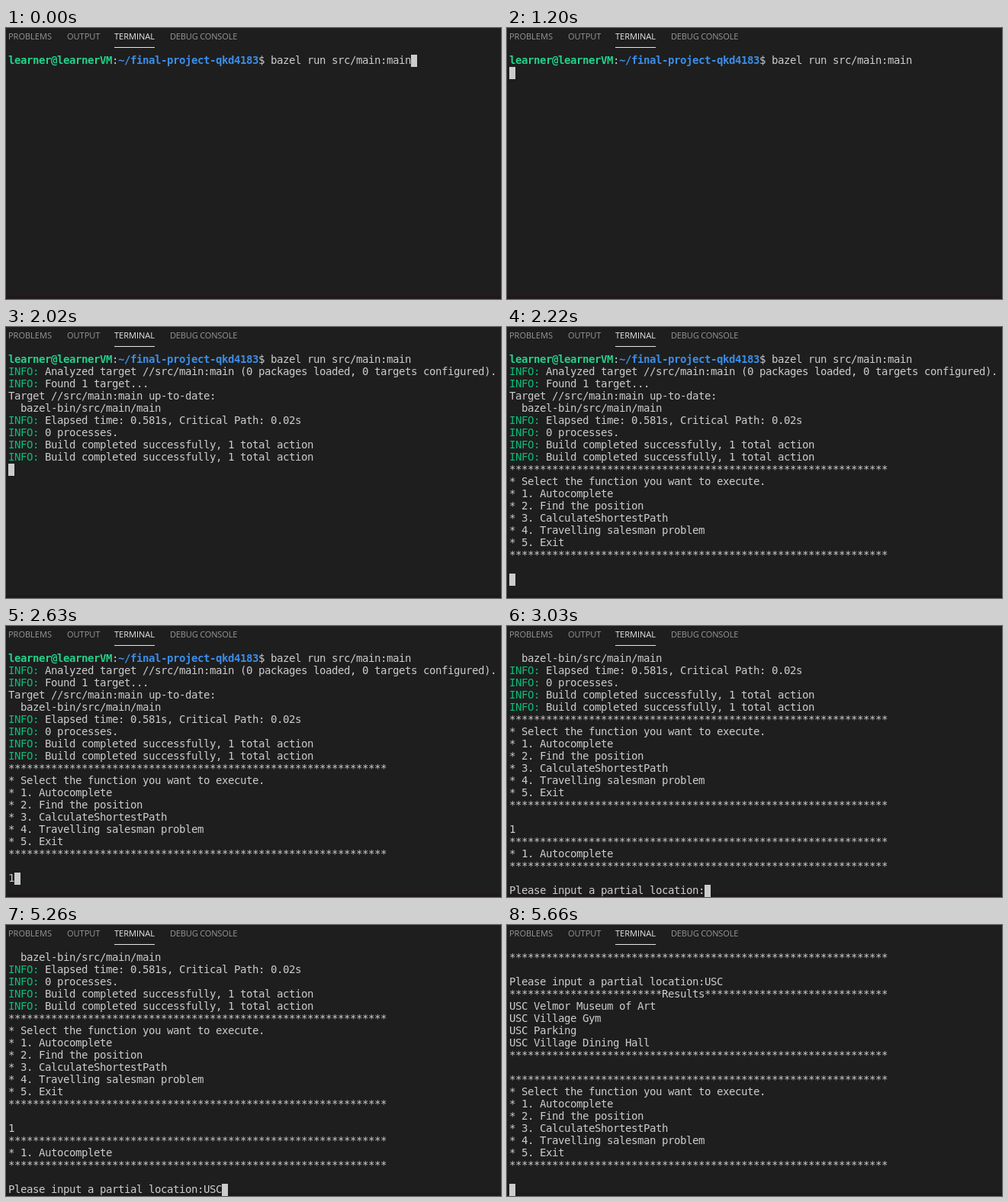
An HTML page that plays this animation: 649 by 355 pixels, repeating every 8110 ms.

```html
<!DOCTYPE html>
<html lang="en">
<head>
<meta charset="utf-8">
<title>Terminal session</title>
<style>
  html, body { margin: 0; width: 100%; height: 100%; overflow: hidden; background: #1e1e1e; }
  #stage { position: relative; width: 649px; height: 355px; overflow: hidden; background: #1e1e1e; }
  #edge { position: absolute; left: 0; right: 0; top: 351px; height: 4px; background: #1f191b; }
  .tab {
    position: absolute; top: 3px; height: 22px; white-space: nowrap;
    font: 11px/15px "Open Sans", "Noto Sans", sans-serif; color: #979797;
  }
  .tab.active { color: #e7e7e7; border-bottom: 1px solid #e7e7e7; }
  .tab.long { letter-spacing: -0.15px; }
  #screen {
    position: absolute; left: 3px; top: 34px; margin: 0; white-space: pre;
    font: 14px/16px "DejaVu Sans Mono", monospace; color: #ccc;
    letter-spacing: calc(8px - 1ch); /* 8px terminal cells */
  }
  #screen div { height: 16px; }
  #screen b { line-height: 16px; }
  .user { color: #23d18b; }
  .path { color: #3b8eea; }
  .info { color: #0dbc79; }
  #cursor { position: absolute; width: 8px; height: 16px; background: #ccc; }
</style>
</head>
<body>
<div id="stage">
  <div id="edge"></div>
  <div class="tab" style="left:3px">PROBLEMS</div>
  <div class="tab" style="left:80px">OUTPUT</div>
  <div class="tab active" style="left:142px">TERMINAL</div>
  <div class="tab long" style="left:215px">DEBUG CONSOLE</div>
  <pre id="screen"></pre>
  <div id="cursor"></div>
</div>
<script>
const LOOP = 8110, ROWS = 20, CELL_W = 8, CELL_H = 16;
const screenEl = document.getElementById('screen');
const cursorEl = document.getElementById('cursor');

const stars = n => '*'.repeat(n);
const rule = stars(62);
const prompt = ['learner@learnerVM', ':', '~/final-project-qkd4183', '$ bazel run src/main:main'];
const command = prompt.join('');

const analyzed = [
  'INFO: Analyzed target //src/main:main (0 packages loaded, 0 targets configured).',
  'INFO: Found 1 target...'
];
const done = 'INFO: Build completed successfully, 1 total action';
const built = [
  command, ...analyzed,
  'Target //src/main:main up-to-date:',
  '  bazel-bin/src/main/main',
  'INFO: Elapsed time: 0.581s, Critical Path: 0.02s',
  'INFO: 0 processes.',
  done, done
];
const menu = [
  rule,
  '* Select the function you want to execute.',
  '* 1. Autocomplete',
  '* 2. Find the position',
  '* 3. CalculateShortestPath',
  '* 4. Travelling salesman problem',
  '* 5. Exit',
  rule, ''
];
const asked = typed => [
  ...built, ...menu, '1',
  rule, '* 1. Autocomplete', rule, '',
  'Please input a partial location:' + typed
];
const results = [
  stars(25) + 'Results' + stars(30),
  'USC Velmor Museum of Art',
  'USC Village Gym',
  'USC Parking',
  'USC Village Dining Hall',
  rule, ''
];

// Start time and full log; the cursor sits after the last line.
const steps = [
  [0, [command]],
  [1200, [command, '']],
  [1620, [command, 'Loading:', '']],
  [1820, [command, ...analyzed, '[0 / 1] checking cached actions', '']],
  [2020, [...built, '']],
  [2220, [...built, ...menu, '']],
  [2630, [...built, ...menu, '1']],
  [3030, asked('')],
  [5060, asked('US')],
  [5260, asked('USC')],
  [5660, [...asked('USC'), ...results, ...menu, '']]
];

function span(tag, cls, text) {
  const el = document.createElement(tag);
  el.className = cls;
  el.textContent = text;
  return el;
}

function lineEl(text) {
  const row = document.createElement('div');
  const label = text.match(/^(INFO:|Loading:|\[0 \/ 1\])/);
  if (text === command) {
    row.append(span('b', 'user', prompt[0]), prompt[1], span('b', 'path', prompt[2]), prompt[3]);
  } else if (label) {
    row.append(span('span', 'info', label[0]), text.slice(label[0].length));
  } else {
    row.textContent = text;
  }
  return row;
}

function show(log) {
  const lines = log.slice(-ROWS);
  const last = lines.length - 1;
  screenEl.replaceChildren(...lines.map(lineEl));
  cursorEl.style.left = 3 + lines[last].length * CELL_W + 'px';
  cursorEl.style.top = 35 + last * CELL_H + 'px';
}

let current = -1;
const start = performance.now();
function tick() {
  const t = (performance.now() - start) % LOOP;
  const next = steps.filter(([at]) => at <= t).length - 1;
  if (next !== current) show(steps[current = next][1]);
  requestAnimationFrame(tick);
}
tick();
</script>
</body>
</html>
```
